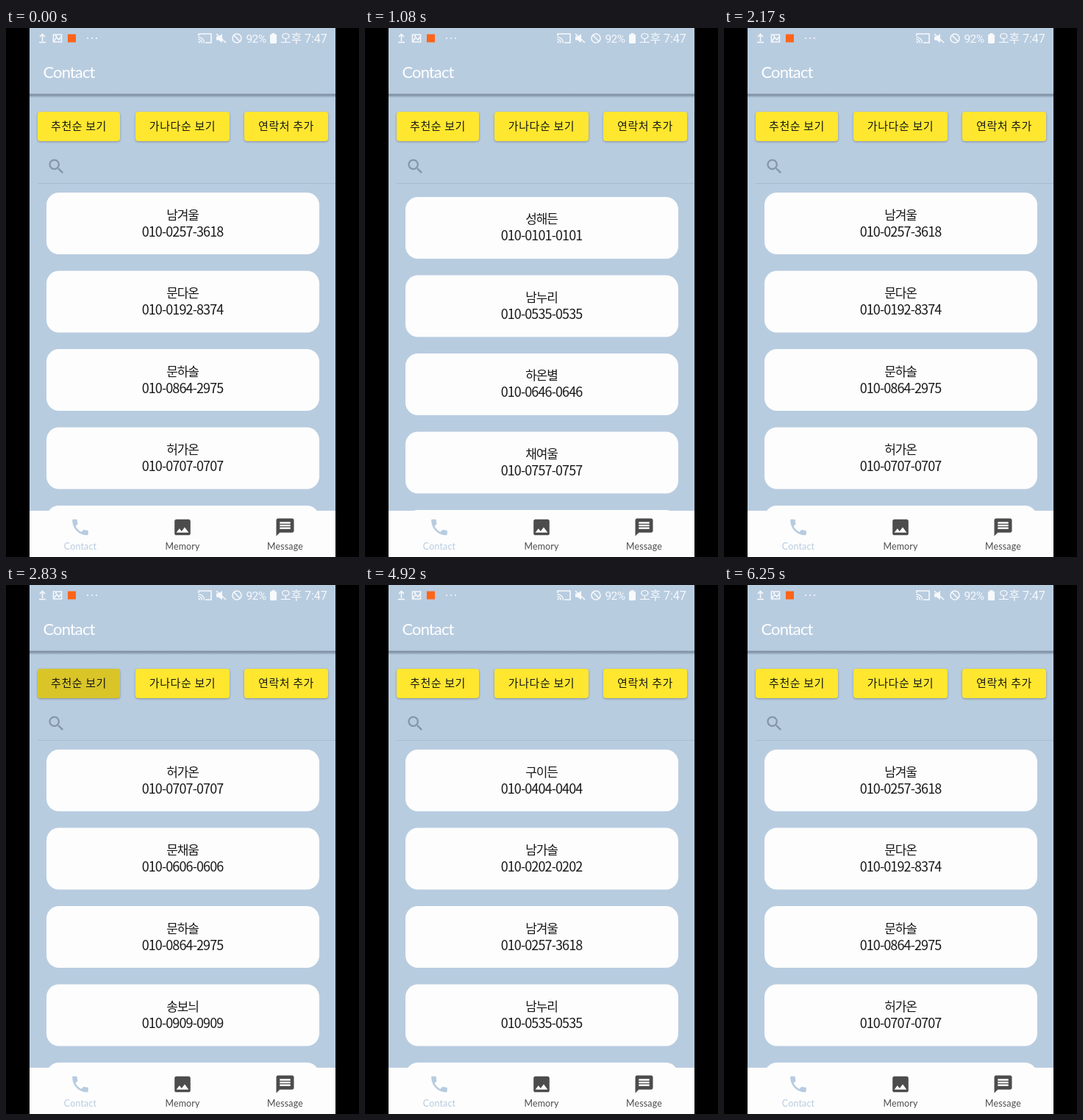
An HTML page with a canvas for the animation above (6290 ms loop, 480 by 720 pixels).

```html
<!DOCTYPE html>
<html lang="ko">
<head>
<meta charset="utf-8">
<title>Contact</title>
<style>
html, body { margin: 0; width: 100%; height: 100%; overflow: hidden; background: #000; }
canvas { display: block; width: 480px; height: 720px; }
</style>
</head>
<body>
<canvas id="stage" width="480" height="720"></canvas>
<script>
const ctx = document.getElementById('stage').getContext('2d');
const LOOP = 6290;
const KR = '"Noto Sans CJK KR", "Noto Sans CJK", sans-serif';
const LATIN = 'Lato, "Open Sans", sans-serif';
const INK = '#181818', SKY = '#b8cce0', PAPER = '#fdfdfd', YELLOW = '#ffe72f';
const LEFT = 32, RIGHT = 448, LIST_TOP = 224, NAV_TOP = 657;
const PITCH = 106.5, MAX_SCROLL = 1271;

const people = [
  ['남겨울', '0257-3618'], ['문다온', '0192-8374'], ['문하솔', '0864-2975'],
  ['허가온', '0707-0707'], ['문채움', '0606-0606'], ['송보늬', '0909-0909'],
  ['윤노을', '0303-0303'], ['남가솔', '0202-0202'], ['유미르', '0505-0505'],
  ['오늘봄', '0808-0808'], ['구이든', '0404-0404'], ['성해든', '0101-0101'],
  ['남누리', '0535-0535'], ['하온별', '0646-0646'], ['채여울', '0757-0757'],
  ['표단비', '0868-0868']
].map(([name, tail]) => ({ name, phone: '010-' + tail }));
const top4 = [3, 4, 2, 5].map(i => people[i]);
const byPick = [...top4, ...people.filter(p => !top4.includes(p))];
const byName = [...people].sort((a, b) => (a.name < b.name ? -1 : 1));

const icons = {
  search: new Path2D('M15.5 14h-.79l-.28-.27C15.41 12.59 16 11.11 16 9.5 16 5.91 13.09 3 9.5 3S3 5.91 3 9.5 5.91 16 9.5 16c1.61 0 3.09-.59 4.23-1.57l.27.28v.79l5 4.99L20.49 19l-4.99-5zm-6 0C7.01 14 5 11.99 5 9.5S7.01 5 9.5 5 14 7.01 14 9.5 11.99 14 9.5 14z'),
  phone: new Path2D('M6.62 10.79c1.44 2.83 3.76 5.14 6.59 6.59l2.2-2.2c.27-.27.67-.36 1.02-.24 1.12.37 2.33.57 3.57.57.55 0 1 .45 1 1V20c0 .55-.45 1-1 1-9.39 0-17-7.61-17-17 0-.55.45-1 1-1h3.5c.55 0 1 .45 1 1 0 1.25.2 2.45.57 3.57.11.35.03.74-.25 1.02l-2.2 2.2z'),
  image: new Path2D('M21 19V5c0-1.1-.9-2-2-2H5c-1.1 0-2 .9-2 2v14c0 1.1.9 2 2 2h14c1.1 0 2-.9 2-2zM8.5 13.5l2.5 3.01L14.5 12l4.5 6H5l3.5-4.5z'),
  message: new Path2D('M20 2H4c-1.1 0-1.99.9-1.99 2L2 22l4-4h14c1.1 0 2-.9 2-2V4c0-1.1-.9-2-2-2zm-2 12H6v-2h12v2zm0-3H6V9h12v2zm0-3H6V6h12v2z')
};

const clamp = v => Math.max(0, Math.min(1, v));
const ramp = (t, from, to) => clamp((t - from) / (to - from));
const pulse = (t, on, off, up, down) => ramp(t, on, on + up) * (1 - ramp(t, off, off + down));
// A short drag, then a fling that slows down.
const fling = p => 1 - (1 - p ** 1.5) ** 3;

function rect(x, y, w, h, color) {
  ctx.fillStyle = color;
  ctx.fillRect(x, y, w, h);
}

function box(x, y, w, h, r, color) {
  ctx.fillStyle = color;
  ctx.beginPath();
  ctx.roundRect(x, y, w, h, r);
  ctx.fill();
}

function raised(x, y, w, h, r, color, blur, drop, shade) {
  ctx.save();
  ctx.shadowColor = shade;
  ctx.shadowBlur = blur;
  ctx.shadowOffsetY = drop;
  box(x, y, w, h, r, color);
  ctx.restore();
}

function text(str, x, y, size, { color = INK, font = KR, gap = 0, align = 'left' } = {}) {
  ctx.font = `${size}px ${font}`;
  ctx.letterSpacing = gap + 'px';
  ctx.textAlign = align;
  ctx.fillStyle = color;
  ctx.fillText(str, x, y);
}

function icon(path, cx, cy, scale, color) {
  ctx.save();
  ctx.translate(cx - 12 * scale, cy - 12 * scale);
  ctx.scale(scale, scale);
  ctx.fillStyle = color;
  ctx.fill(path);
  ctx.restore();
}

function line(points, width = 1.6) {
  ctx.lineWidth = width;
  ctx.beginPath();
  points.forEach(([x, y], i) => (i ? ctx.lineTo(x, y) : ctx.moveTo(x, y)));
  ctx.stroke();
}

function arc(x, y, r, from = 0, to = Math.PI * 2) {
  ctx.beginPath();
  ctx.arc(x, y, r, from, to);
  ctx.stroke();
}

function scrollAt(t) {
  return MAX_SCROLL * (fling(ramp(t, 40, 663)) - fling(ramp(t, 1000, 1869)));
}

function orderAt(t) {
  if (t < 2740 || t >= 5960) return people;
  return t < 3540 ? byPick : byName;
}

function statusBar() {
  const color = '#f7f9fb';
  ctx.strokeStyle = color;
  line([[49.5, 18], [49.5, 8.5]]);
  line([[46, 12], [49.5, 8.5], [53, 12]]);
  line([[45, 19.5], [54, 19.5]]);
  ctx.lineWidth = 1.5;
  ctx.strokeRect(64.5, 9, 11, 10);
  line([[65, 18], [69, 13], [72, 16], [75, 12]]);
  rect(67, 10, 2, 2, color);
  rect(84, 8.5, 11, 11, '#ff6418');
  for (const x of [111, 117, 123]) rect(x - 0.8, 13, 1.8, 1.8, color);

  line([[262, 11], [262, 8], [279, 8], [279, 20], [271, 20]]);
  ctx.lineWidth = 1.4;
  for (const r of [2, 5, 8]) arc(261.5, 20.5, r, -Math.PI / 2, 0);
  ctx.fillStyle = color;
  ctx.beginPath();
  ctx.moveTo(286, 11.5);
  ctx.lineTo(289, 11.5);
  ctx.lineTo(294, 8);
  ctx.lineTo(294, 20);
  ctx.lineTo(289, 16.5);
  ctx.lineTo(286, 16.5);
  ctx.fill();
  line([[286, 8], [299, 20]]);
  arc(314, 14, 6);
  line([[310, 10], [318, 18]]);
  text('92%', 326.5, 20, 15.5, { color, font: 'Roboto, sans-serif', gap: -0.6 });
  rect(361.5, 7, 4, 2, color);
  box(359, 8.5, 9, 12.5, 1.5, color);
  text('오후 7:47', 373, 20, 16, { color, font: 'Roboto, ' + KR, gap: -0.1 });
}

function sortButton(label, x, w, press = 0) {
  raised(x, 114, w, 40, 4, YELLOW, 3, 1, 'rgba(60,60,60,.45)');
  if (press) box(x, 114, w, 40, 4, `rgba(0,0,0,${0.15 * press})`);
  text(label, x + w / 2, 139.3, 15, { gap: 0.6, align: 'center' });
}

function contactList(t) {
  const scroll = scrollAt(t);
  ctx.save();
  ctx.beginPath();
  ctx.rect(LEFT, LIST_TOP, RIGHT - LEFT, NAV_TOP - LIST_TOP);
  ctx.clip();
  orderAt(t).forEach((p, i) => {
    const y = LIST_TOP + i * PITCH - scroll;
    if (y < 130 || y > NAV_TOP) return;
    box(55, y, 371, 84, 17, PAPER);
    text(p.name, 240, y + 36.5, 17, { gap: -1.2, align: 'center' });
    text(p.phone, 240, y + 59.5, 18, { gap: -0.9, align: 'center' });
  });
  ctx.restore();
}

function navBar() {
  rect(LEFT, NAV_TOP, RIGHT - LEFT, 63, PAPER);
  const off = '#4c4c4c';
  [['Contact', 101, 'phone', SKY], ['Memory', 240, 'image', off], ['Message', 379.5, 'message', off]]
    .forEach(([label, x, name, color]) => {
      icon(icons[name], x, 679.5, 1.2, color);
      text(label, x, 709.5, 12.4, { color, font: LATIN, gap: 0.2, align: 'center' });
    });
}

function page(t) {
  rect(LEFT, 0, RIGHT - LEFT, 720, SKY);
  const shade = ctx.createLinearGradient(0, 89, 0, 95);
  shade.addColorStop(0, 'rgba(80,95,115,.1)');
  shade.addColorStop(0.3, 'rgba(80,95,115,.6)');
  shade.addColorStop(1, 'rgba(80,95,115,0)');
  rect(LEFT, 89, RIGHT - LEFT, 6, shade);
  text('Contact', 50.5, 67.5, 22, { color: '#fff', font: LATIN, gap: -0.9 });

  sortButton('추천순 보기', 43, 112, pulse(t, 2640, 2870, 60, 140));
  sortButton('가나다순 보기', 176, 128, pulse(t, 3440, 3670, 60, 140));
  sortButton('연락처 추가', 324, 114);
  icon(icons.search, 68.5, 188.5, 1.12, '#8496a6');
  rect(43, 211, RIGHT - 43, 1, 'rgba(90,110,130,.18)');
  contactList(t);
  navBar();
}

function field(label, value, x, y, rule, gap = -1) {
  text(label, 79, y, 15, { gap: -0.9 });
  text(value, x, y + 1, 20, { gap });
  rect(x, rule, 397 - x, 1, '#c4c4c4');
}

function dialog() {
  raised(61, 168, 359, 411, 2, PAPER, 22, 9, 'rgba(0,0,0,.6)');
  text('안부모음', 89, 209.5, 20, { gap: -1.1 });
  const person = byName[0];
  field('이름:', person.name, 113, 265.5, 273.5, -2);
  field('전화번호:', person.phone, 138, 315, 323);
  field('생일:', '2003-03-16', 113, 364.5, 373);
  field('첫인사 날짜:', '2020-02-27', 156, 414, 422.5);
  field('마지막인사 날짜:', '2021-06-17', 182, 476, 497);
  for (const [label, x] of [['수정', 129], ['닫기', 240]]) {
    raised(x, 514, 102.5, 42, 4, SKY, 3, 1, 'rgba(50,60,70,.45)');
    text(label, x + 51.5, 540.5, 15, { align: 'center' });
  }
}

function touchDot(x, y) {
  ctx.beginPath();
  ctx.arc(x, y, 13, 0, Math.PI * 2);
  ctx.fillStyle = 'rgba(255,255,255,.75)';
  ctx.fill();
  ctx.strokeStyle = 'rgba(110,115,120,.6)';
  ctx.lineWidth = 1.2;
  ctx.stroke();
}

function faded(alpha, paint) {
  if (!alpha) return;
  ctx.save();
  ctx.globalAlpha = alpha;
  paint();
  ctx.restore();
}

function draw(t) {
  rect(0, 0, 480, 720, '#000');
  page(t);
  faded(pulse(t, 5130, 5960, 150, 200), () => {
    rect(LEFT, 0, RIGHT - LEFT, 720, 'rgba(0,0,0,.54)');
    dialog();
  });
  statusBar();
  faded(pulse(t, 5760, 5900, 40, 40), () => touchDot(308.5, 543.5));
  rect(0, 0, LEFT, 720, '#000');
  rect(RIGHT, 0, 480 - RIGHT, 720, '#000');
}

function tick(now) {
  draw(now % LOOP);
  requestAnimationFrame(tick);
}
requestAnimationFrame(tick);
</script>
</body>
</html>
```
